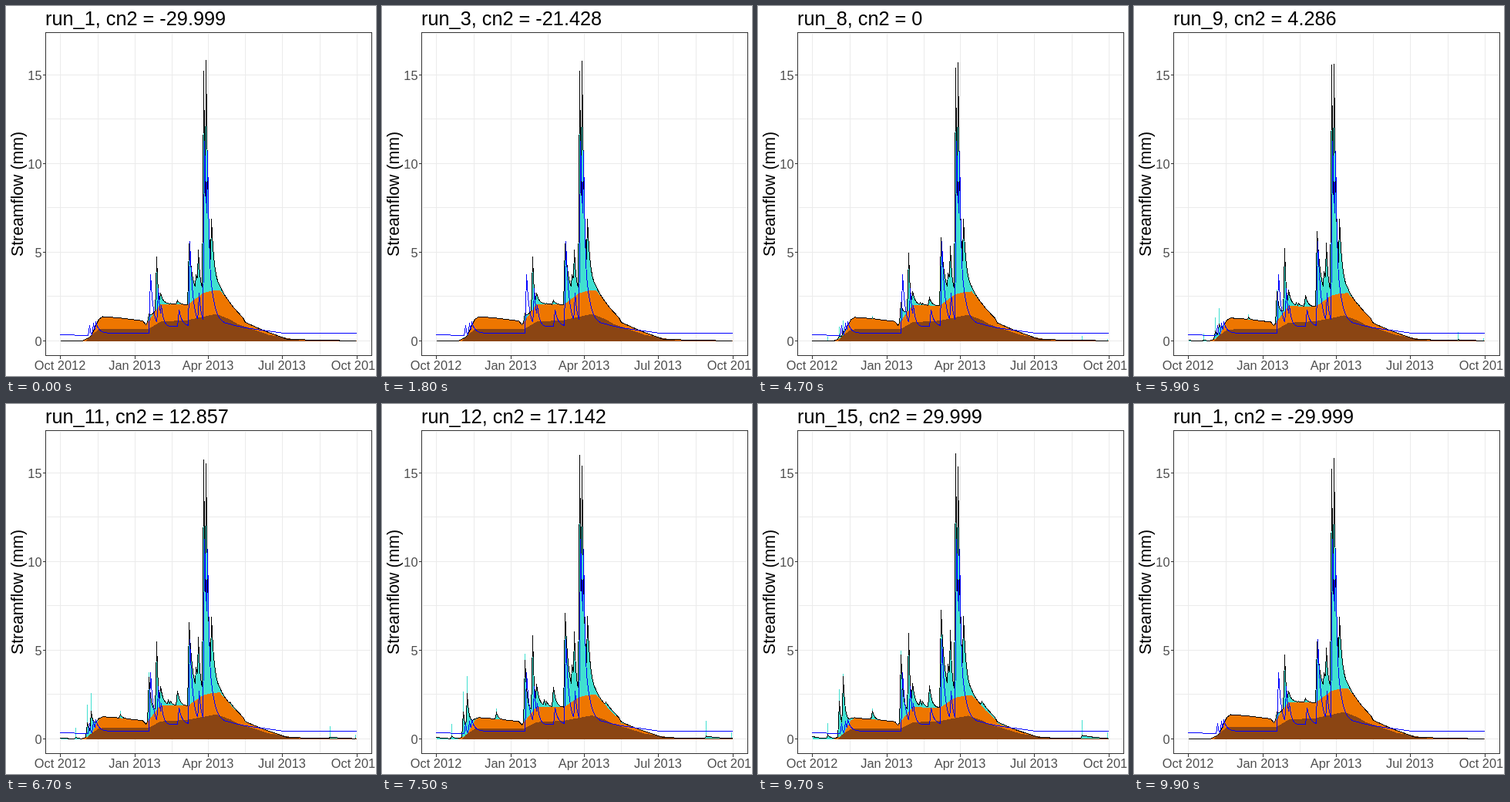
These frames come from a looping animation (480 px wide and 480 px high, 10 s). An HTML page:

```html
<!DOCTYPE html>
<html lang="en">
<head>
<meta charset="utf-8">
<title>Streamflow runs</title>
<style>
  html, body { margin: 0; width: 100%; height: 100%; overflow: hidden; background: #fff; }
  svg { display: block; width: 480px; height: 480px; }
  text { font-family: "Liberation Sans", Arial, sans-serif; font-size: 16.4px; fill: #4d4d4d; }
  #title, #label { fill: #000; }
  #title { font-size: 25.3px; }
  #label { font-size: 21.3px; text-anchor: middle; }
  #plot { shape-rendering: crispEdges; fill: none; stroke-width: 1; }
</style>
</head>
<body>
<svg viewBox="0 0 480 480">
  <g id="plot" transform="translate(.5 .5)">
    <path id="grid" stroke="#ebebeb"/>
    <path id="surface" fill="#40e0d0"/>
    <path id="lateral" fill="#ee7600"/>
    <path id="ground" fill="#8b4513"/>
    <path id="total" stroke="#000"/>
    <path id="observed" stroke="#00f"/>
    <path id="axes" stroke="#333"/>
  </g>
  <g id="ticks"></g>
  <text id="label" transform="translate(22 244) rotate(-90)">Streamflow (mm)</text>
  <text id="title" x="51" y="25"></text>
</svg>
<script>
const $ = id => document.getElementById(id);
const setPath = (id, d) => $(id).setAttribute('d', d);
const mix = (a, b, f) => a + (b - a) * f;

const LEFT = 70, RIGHT = 454, ZERO = 434, FLOOR = ZERO + .6;

// Straight lines between key points [x, height].
const between = keys => x => {
  const i = Math.max(1, keys.findIndex(k => k[0] >= x));
  const [[x0, h0], [x1, h1]] = [keys[i - 1], keys[i]];
  return mix(h0, h1, (x - x0) / (x1 - x0));
};

// A storm rises at once and then recedes exponentially.
const RISE = 1.7;
const pulse = (x, at, peak, decay) =>
  peak * (x < at ? Math.max(0, 1 - (at - x) / RISE) : Math.exp((at - x) / decay));

const curve = height => {
  let d = '';
  for (let x = LEFT; x <= RIGHT; x++) d += `${d ? 'L' : 'M'}${x} ${(ZERO - height(x)).toFixed(2)}`;
  return d;
};
const area = height => `${curve(height)}L${RIGHT} ${FLOOR}H${LEFT}Z`;

// Slow flow in the first run, stacked
const lateral = between([[70, 0], [98, 0], [107, 4], [111, 8], [116, 20], [120, 28], [125, 31.5],
  [145, 30], [177, 26], [181, 21], [190, 34], [200, 48], [235, 47], [255, 62], [266, 65], [277, 66],
  [285, 56], [295, 43], [307, 30], [310, 24], [335, 13], [365, 2], [454, 0]]);
const ground = between([[70, 0], [104, 0], [108, 6], [120, 15], [130, 16], [185, 16], [200, 25],
  [235, 27], [272, 35], [290, 28], [300, 22], [340, 8], [380, 1], [454, 0]]);

// Storms: x, peak in the first run, peak in the last runs, decay, runoff held back from the river
const storms = [
  [70, 0, 5, 10], [90, 0, 8, 4, 23], [105, 0, 70, 3, 22], [110, 0, 113, 3, 5], [148, 0, 17, 2.5, 4],
  [185, 8, 125, 3, 12], [195, 68, 119, 1.8], [200, 14, 40, 3.5], [210, 1, 15, 2], [213, 1, 11, 3],
  [222, 5, 40, 3], [237, 78, 149, 5], [246, 31, 60, 6], [249, 61, 108, 2.5], [256, 288, 331, 2.4],
  [259, 301, 298, 3], [266, 93, 109, 4], [290, 0, 9, 15], [420, 0, 6, 20, 30], [453, 0, 2, 5, 11],
];

const slow = between([[70, 8], [106, 7], [125, 10], [185, 10], [205, 18], [290, 21], [310, 17],
  [360, 10], [454, 9.5]]);
const observedStorms = [[108, 13, 1], [113, 15, 1.5], [116, 17, 4], [187, 76, 4], [197, 54, 3],
  [201, 30, 3], [224, 22, 4], [238, 110, 4], [250, 43, 3], [257, 240, 6], [261, 227, 3]];
setPath('observed', curve(x =>
  slow(x) + Math.max(...observedStorms.map(s => pulse(x, ...s)))));

// Grid, axes and labels
const flowY = mm => Math.floor(ZERO - mm * 22.97);
const dates = { 70: 'Oct 2012', 167: 'Jan 2013', 262: 'Apr 2013', 358: 'Jul 2013', 455: 'Oct 2013' };
let grid = '', axes = 'M51 34H474V453H51Z', labels = '';
for (const x of [...Object.keys(dates), 119, 215, 310, 407]) grid += `M${x} 35V453`;
for (let mm = 0; mm < 17.5; mm += 2.5) grid += `M52 ${flowY(mm)}H474`;
for (const [x, date] of Object.entries(dates)) {
  axes += `M${x} 453v4`;
  labels += `<text x="${x}" y="472" text-anchor="middle">${date}</text>`;
}
for (let mm = 0; mm <= 15; mm += 5) {
  axes += `M51 ${flowY(mm)}h-4`;
  labels += `<text x="46.5" y="${flowY(mm) + 6.5}" text-anchor="end">${mm}</text>`;
}
setPath('grid', grid);
setPath('axes', axes);
$('ticks').innerHTML = labels;

// Each change to the next run takes three steps.
const changes = [400, 1100, 1800, 2500, 3200, 3900, 4600, 5200, 5900, 6600, 7300, 7900, 8500, 9200, 9700];
const LOOP = 10000, STEP = 100, RUNS = 15;
const level = run => (Math.min(run, 14) - 1) / 13;

function draw(t) {
  const done = changes.filter(start => start <= t).length;
  const from = Math.max(1, done), to = done ? from % RUNS + 1 : 1;
  const f = done ? Math.min(1, (Math.floor((t - changes[done - 1]) / STEP) + 1) / 3) : 1;
  const weight = power => mix(level(from) ** power, level(to) ** power, f);
  const w = weight(3), late = weight(4.5), excess = weight(2.7);

  const shrink = 1 - .21 * w;
  const base = x => lateral(x) * shrink;
  // Storms absent from the first run appear later than the others grow.
  const current = storms.map(([at, first, last, decay]) =>
    [at, mix(first, last, first ? w : late), decay]);
  const total = x => base(x) + Math.max(...current.map(s => pulse(x, ...s)));
  const held = storms.filter(s => s[4]).map(([at, , last, , extra]) => {
    const top = ZERO - base(at) - (last + extra) * excess;
    return `M${at - 1} ${FLOOR}L${at - .5} ${top}H${at + .5}L${at + 1} ${FLOOR}Z`;
  });

  setPath('surface', area(total) + held.join(''));
  setPath('lateral', area(base));
  setPath('ground', area(x => ground(x) * shrink));
  setPath('total', curve(total));

  const run = f < .5 ? from : to;
  const cn2 = +(-29.999 + (run - 1) * 59.998 / (RUNS - 1)).toFixed(3);
  $('title').textContent = `run_${run}, cn2 = ${cn2}`;
}

const begin = performance.now();
let shown = -1;
function tick() {
  const step = Math.floor((performance.now() - begin) % LOOP / STEP);
  if (step !== shown) draw(step * STEP);
  shown = step;
  requestAnimationFrame(tick);
}
tick();
</script>
</body>
</html>
```
